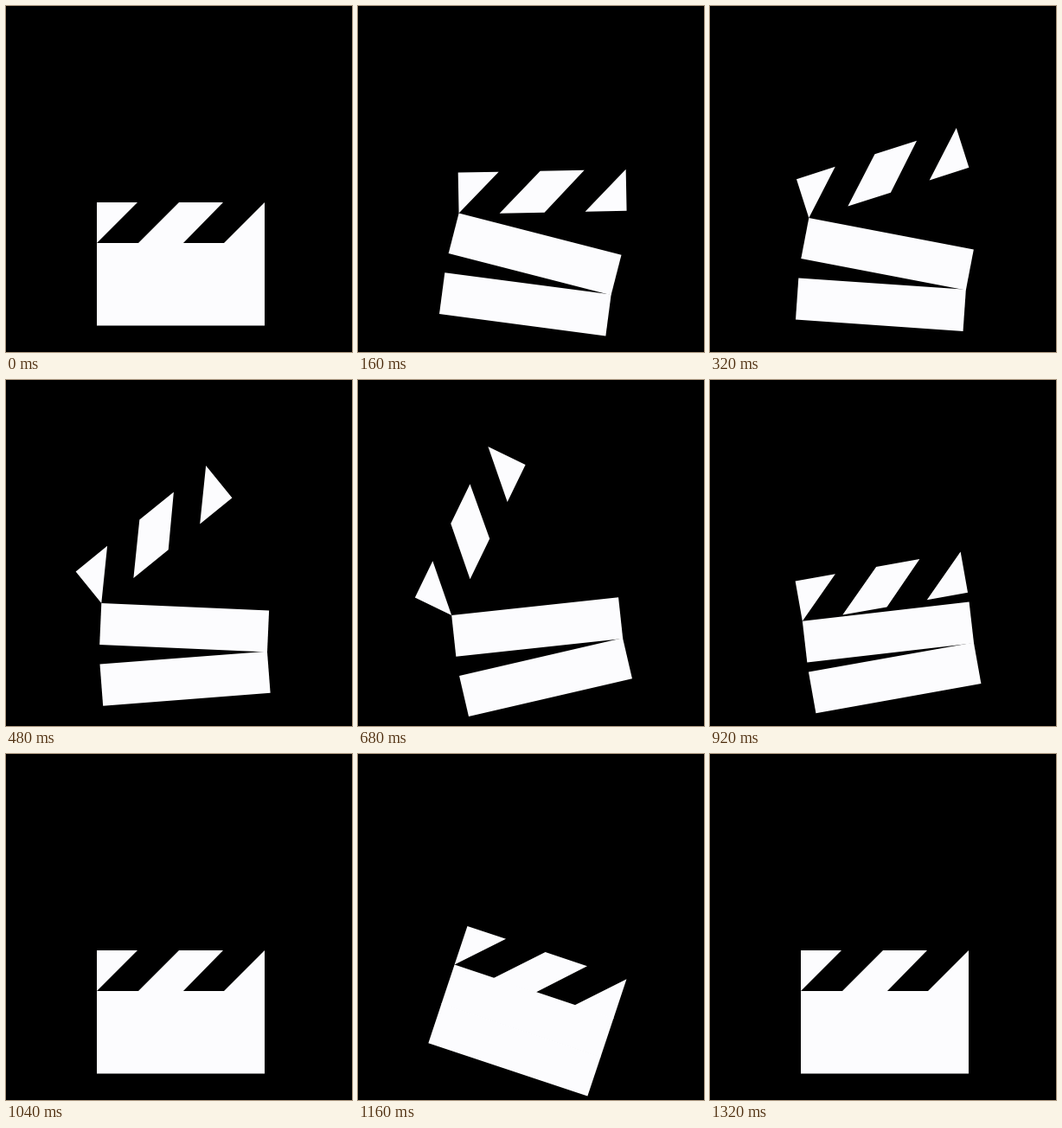
Animation, 400 px wide and 400 px high, one loop 1.48 s. Source, as an HTML page:

```html
<!DOCTYPE html>
<html>
<head>
<meta charset="utf-8">
<title>Clapperboard</title>
<style>
  html, body { margin: 0; height: 100%; overflow: hidden; background: #000; }
  svg { display: block; width: 100vw; height: 100vh; fill: #fcfcfe; }
</style>
</head>
<body>
<svg viewBox="0 0 400 400">
  <g id="board">
    <path d="M105 321.2H299V369.5H105Z"/>
    <g id="slate">
      <path d="M105 274H299V322H105Z"/>
      <path id="stick" d="M105 227H152L105 274Z M200 227H251L204 275H152Z M299 227V275H251Z"/>
    </g>
  </g>
</svg>
<script>
const LOOP = 1480, STEP = 40, LAST = 1320;

const linear = u => u;
const smooth = u => (1 - Math.cos(Math.PI * u)) / 2;
const speedUp = u => u ** 2.3;

// Each part turns about its pivot; keys are [time, degrees, easing into the key].
const parts = [
  { id: 'board', pivot: '202 279', keys: [
    [0, 0], [160, 7.5, smooth], [760, -14, smooth], [1040, 0, speedUp],
    [1120, 20.4, smooth], [1320, 0, smooth]] },
  { id: 'slate', pivot: '299 322', keys: [
    [0, 0], [160, 6.9, smooth], [805, 6.9, linear], [1040, 0, smooth]] },
  { id: 'stick', pivot: '105 274', keys: [
    [0, 0], [160, -15.5, linear], [680, -58, linear], [965, 0, smooth]] },
];

function angleAt(keys, t) {
  const i = keys.findIndex(key => key[0] > t);
  if (i < 0) return keys[keys.length - 1][1];
  const [t0, a0] = keys[i - 1], [t1, a1, ease] = keys[i];
  return a0 + (a1 - a0) * ease((t - t0) / (t1 - t0));
}

function draw() {
  const now = performance.now() % LOOP;
  const t = Math.min(LAST, Math.floor(now / STEP) * STEP);
  for (const { id, pivot, keys } of parts) {
    document.getElementById(id).setAttribute('transform', `rotate(${angleAt(keys, t)} ${pivot})`);
  }
  requestAnimationFrame(draw);
}
draw();
</script>
</body>
</html>
```
